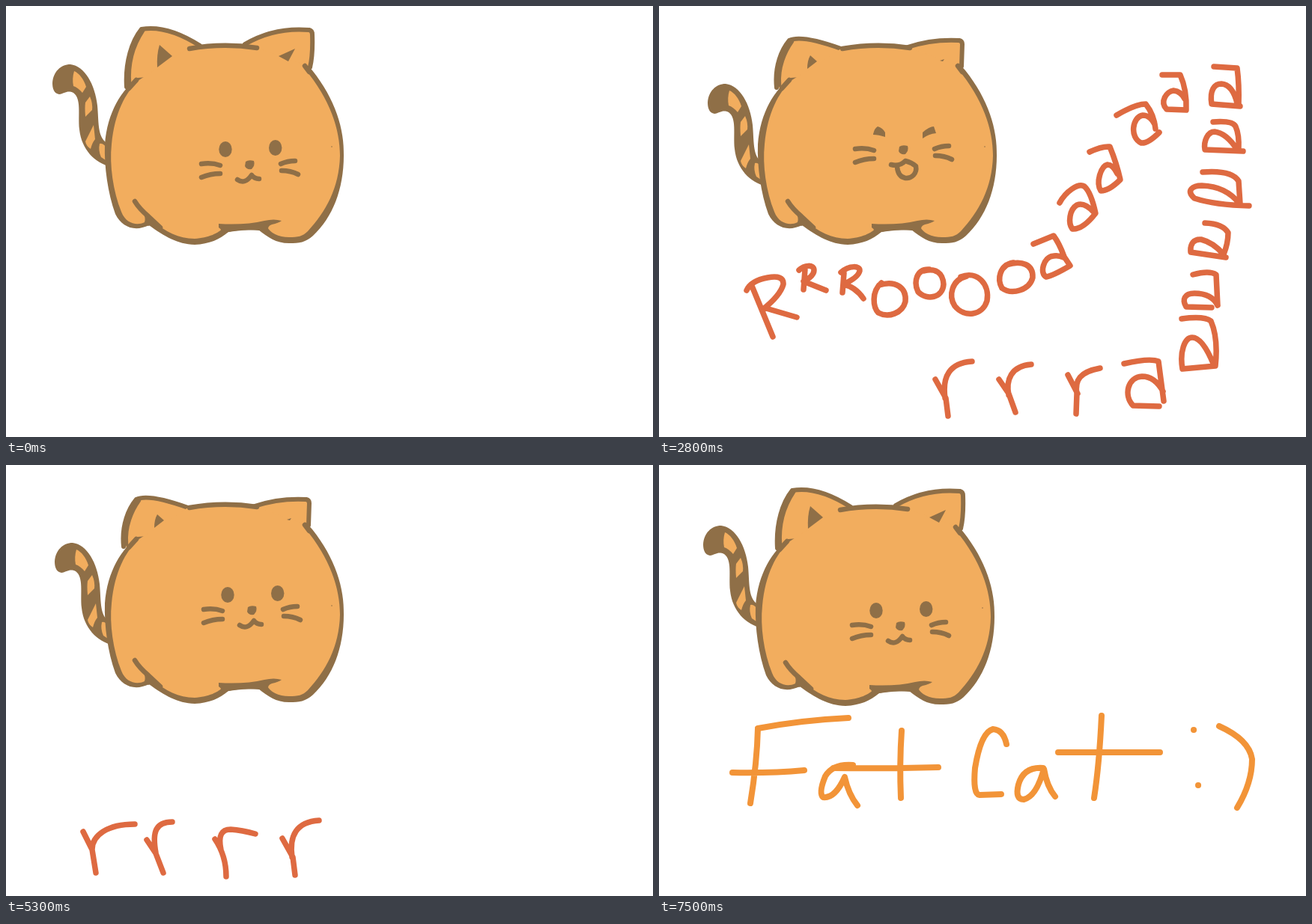
Animation, 864 px wide and 576 px high, one loop 9300 ms. Source, as an HTML page:

```html
<!DOCTYPE html>
<html lang="en">
<head>
<meta charset="utf-8">
<title>Round cat</title>
<style>
  html, body { margin: 0; width: 100%; height: 100%; overflow: hidden; background: #fff; }
  svg { display: block; width: 864px; height: 576px; --brown: #8f6f47; --fur: #f2ad5e; }
  path { stroke-linecap: round; stroke-linejoin: round; }
  .fur { fill: var(--fur); }
  .dark { fill: var(--brown); }
  .line { fill: none; stroke: var(--brown); stroke-width: 6.5; }
  .ear { fill: var(--fur); stroke: var(--brown); stroke-width: 6; }
  .roar { fill: none; stroke: #de6a41; stroke-width: 7.5; }
  .title { fill: none; stroke: #f29438; stroke-width: 8; }

  .anim { animation: 9.3s step-end infinite; }
  .scene { animation-name: scene; }
  .tail { animation-name: tail; }
  .ears-up { animation-name: ears-up; }
  .ears-down { animation-name: ears-down; }
  .face { animation-name: face; }
  .calm { animation-name: calm; }
  .open { animation-name: open; }
  .half { animation-name: half; }
  .eyes { animation-name: eyes; }
  .lids { animation-name: lids; }
  .title { animation-name: title; }
  .nudge { animation-name: nudge; }

  /* each letter lives 2.6 s, one starting every 0.1 s */
  .roar path {
    visibility: hidden;
    animation: letter 9.3s step-end calc(700ms + 100ms * var(--k)) infinite;
  }
  .roar .first { animation-name: first; }

  @keyframes letter { 0% { visibility: visible } 27.95%, 100% { visibility: hidden } }
  @keyframes first { 0% { visibility: visible } 26.88%, 100% { visibility: hidden } }
  @keyframes nudge {
    0% { transform: translate(-3px, 8px) }
    26.881% { transform: none }
    34.408%, 100% { transform: translate(-5px, 14px) }
  }
  @keyframes scene {
    0% { transform: none }
    64.516%, 100% { transform: translate(-3px, 3px) }
  }
  @keyframes tail {
    0% { transform: none }
    5.376% { transform: translate(1.5px, 13px) }
    6.451% { transform: translate(3px, 26px) }
    64.516% { transform: translate(2px, 17px) }
    65.591% { transform: translate(1px, 9px) }
    66.666%, 100% { transform: none }
  }
  @keyframes ears-up {
    0% { transform: none; visibility: visible }
    5.376% { transform: translate(-1.5px, 6px); visibility: visible }
    6.451% { visibility: hidden }
    64.516% { transform: translate(-2px, 8px); visibility: visible }
    65.591% { transform: translate(-1px, 4px); visibility: visible }
    66.666%, 100% { transform: none; visibility: visible }
  }
  @keyframes ears-down {
    0% { visibility: hidden }
    6.451% { visibility: visible }
    64.516%, 100% { visibility: hidden }
  }
  @keyframes face {
    0% { transform: none }
    5.376% { transform: translate(1.5px, -9px) }
    6.451% { transform: translate(1px, -20px) }
    32.258% { transform: translate(3px, -18px) }
    64.516% { transform: translate(2px, -12px) }
    65.591% { transform: translate(1px, -6px) }
    66.666%, 100% { transform: none }
  }
  @keyframes calm {
    0% { opacity: 1 }
    6.451% { opacity: 0 }
    32.258%, 100% { opacity: 1 }
  }
  @keyframes half {
    0% { visibility: hidden }
    6.451% { visibility: visible }
    7.526% { visibility: hidden }
    29.032% { visibility: visible }
    32.258%, 100% { visibility: hidden }
  }
  @keyframes open {
    0% { visibility: hidden }
    7.526% { visibility: visible }
    29.032%, 100% { visibility: hidden }
  }
  @keyframes eyes {
    0% { visibility: visible }
    68.817% { visibility: hidden }
    70.967% { visibility: visible }
    75.268% { visibility: hidden }
    76.344% { visibility: visible }
    77.419% { visibility: hidden }
    78.494%, 100% { visibility: visible }
  }
  @keyframes lids {
    0% { visibility: hidden }
    68.817% { visibility: visible }
    70.967% { visibility: hidden }
    75.268% { visibility: visible }
    76.344% { visibility: hidden }
    77.419% { visibility: visible }
    78.494%, 100% { visibility: hidden }
  }
  @keyframes title { 0% { visibility: hidden } 80.645%, 100% { visibility: visible } }
</style>
</head>
<body>
<svg viewBox="0 0 864 576" role="img" aria-label="A round cat roars">
  <g class="anim scene">
    <g class="anim tail">
      <path class="dark" d="M62 103C63 88 73 78 86 78C105 80 119 105 122 133C124 155 122 172 133 182L145 200L140 215C118 209 101 192 98 165C96 145 101 124 90 116C82 112 78 117 71 118C64 117 62 110 62 103Z"/>
      <path class="fur" d="M91 87C98 90 104 98 107 108L102 116Q96 109 90 107Q88 97 91 87Z"/>
      <path class="fur" d="M112 121Q116 130 115 139L106 148Q105 136 106 129Z"/>
      <path class="fur" d="M117 159L119 178Q115 183 113 191Q107 187 106 181Z"/>
      <path class="fur" d="M125 184Q129 183 133 188L133 206L127 202Q123 193 125 184Z"/>
    </g>
    <g class="anim ears-up">
      <path class="ear" d="M161 108C159 75 168 47 181 31Q215 25 259 53L250 100L175 112"/>
      <path class="ear" d="M319 51Q358 28 405 32Q409 33 409 38Q410 65 406 82L360 100"/>
      <path class="line" d="M164 104C162 76 170 51 182 33"/>
    </g>
    <g class="anim ears-down">
      <path class="ear" d="M157 109C154 80 164 58 174 46Q190 38 243 57L250 100L175 112"/>
      <path class="ear" d="M332 55Q365 44 401 46Q405 47 405 51L404 81L360 100"/>
      <path class="line" d="M160 105C158 82 167 61 177 47"/>
    </g>

    <path class="dark" d="M176 96C155 111 135 142 132 185C131 215 136 250 146 278C155 296 172 302 191 293C212 308 228 318 252 319C272 318 285 312 297 302Q316 299 337 299C350 309 360 317 378 317C392 317 400 316 410 307C436 283 451 245 451 200C452 165 440 125 409 86Q402 78 397 78Z"/>
    <path class="fur" d="M176 100C160 116 145 142 141 185C138 212 143 248 154 275C160 291 175 294 185 289L194 286C214 302 230 311 252 311C270 310 285 303 289 297L349 295C352 303 364 309 378 309C390 309 396 308 403 301C427 275 445 243 446 200C446 165 433 125 399 84L397 78L338 57Q290 49 243 57Z"/>
    <path class="line" d="M174 99L164 110M399 80L405 88M245 57Q290 49 335 56"/>
    <path class="line" d="M172 261Q178 271 190 281L206 296"/>
    <path class="dark" d="M185 289Q187 283 183 277L200 290L190 294Z"/>
    <path class="dark" d="M284 291Q320 293 345 287Q358 284 368 287Q364 290 355 292Q349 294 350 300L338 300Q315 298 297 302L288 305Q289 299 284 296Z"/>
    <circle class="dark" cx="435" cy="188" r=".8"/>

    <g class="anim ears-up dark">
      <path d="M205 52L222 67L202 82Q201 65 205 52Z"/>
      <path d="M386 57L364 67L377 74Z"/>
    </g>
    <g class="anim ears-down dark">
      <path d="M202 66L211 74L198 84Q198 73 202 66Z"/>
      <path d="M375 73L381 71L379 74Z"/>
    </g>

    <g class="anim face">
      <path class="line" d="M261 211Q275 209 286 213M261 229Q273 224 286 224M367 211Q376 207 386 207M368 220Q380 220 390 225"/>
      <path class="dark" d="M320 208Q324 205 331 207Q333 213 328 218Q321 219 319 214Z"/>
      <g class="anim calm">
        <path class="line" d="M309 232Q319 239 328 226Q332 231 338 231"/>
        <g class="anim eyes dark">
          <ellipse cx="293" cy="191.5" rx="8.7" ry="10.6"/>
          <ellipse cx="359.7" cy="189.5" rx="8.7" ry="10.6"/>
        </g>
        <path class="anim lids line" d="M278 192Q289 196 301 192M347 190Q356 194 365 190"/>
      </g>
    </g>
    <g class="anim open">
      <path class="line" d="M310 212Q321 214 329 206Q333 211 340 213C346 215 348 228 350 239Q348 252 331 252C314 252 305 247 305 237Q306 221 311 213"/>
      <path class="dark" d="M283 167Q292 161 302 170L302 174Q292 170 284 169ZM354 174Q361 163 373 164L372 168Q364 169 355 175Z"/>
    </g>
    <g class="anim half">
      <path class="line" d="M310 212Q321 215 329 207Q337 209 343 214C345 224 337 231 329 230Q319 228 318 215"/>
      <path class="dark" d="M286 171Q288 163 292 161Q299 163 302 169L302 175Q293 172 286 172ZM352 177L352 169Q361 161 367 161L370 170Q360 171 352 177Z"/>
    </g>
  </g>

  <g class="roar" aria-label="Rrrooooaaaaarrrr">
    <path class="first" style="--k:0" d="M117 380Q123 367 145 363Q167 359 166 372Q162 387 138 406L143 404L184 416M124 374L152 442"/>
    <path style="--k:1" d="M187 353C194 346 207 345 207 353Q207 361 193 368L223 380M195 352L193 379"/>
    <path style="--k:2" d="M243 356C254 346 269 347 268 354Q266 363 246 372Q262 375 273 391M247 357L245 383"/>
    <path style="--k:3" d="M297 370C283 382 286 403 293 410C306 417 325 411 329 395C331 376 315 366 294 373"/>
    <path style="--k:4" d="M361 352C343 351 340 370 346 382C358 394 379 390 380 372C379 356 369 350 354 354"/>
    <path style="--k:5" d="M411 361C391 366 386 387 395 401C408 417 432 414 438 394C442 372 425 353 403 362"/>
    <path style="--k:6" d="M473 343C455 346 451 365 458 377C472 387 495 379 499 363C500 346 485 339 464 346"/>
    <path style="--k:7" d="M500 318L527 307Q535 318 541 335L549 347Q527 360 517 362C508 358 513 335 527 334Q534 333 540 336"/>
    <path style="--k:8" d="M535 263C543 248 560 236 568 241Q577 249 583 277Q566 299 552 298C546 290 548 272 558 266Q568 262 580 275"/>
    <path style="--k:9" d="M575 195Q592 187 602 188Q611 210 616 232Q601 247 590 247C583 236 590 214 599 212Q606 212 612 224"/>
    <path style="--k:10" d="M611 146Q636 131 650 131Q661 145 663 164M668 169Q653 184 644 183C628 176 632 148 646 146Q656 146 662 158"/>
    <path style="--k:11" d="M672 92L696 92Q705 112 704 139L678 138C668 128 678 114 687 113Q697 114 702 124"/>
    <path style="--k:12" d="M741 81L772 83Q775 105 774 133M776 134L738 131C735 112 742 104 751 104Q766 105 772 130"/>
    <path style="--k:13" d="M740 155Q766 153 770 161Q775 172 774 192M780 194L729 192C727 180 733 168 742 168Q758 170 772 192"/>
    <path style="--k:14" d="M726 222Q765 219 774 234L776 264M788 267Q743 266 715 257C703 246 713 240 725 240Q757 241 775 264"/>
    <path style="--k:15" d="M729 290Q753 291 760 303Q760 317 754 332M757 336L710 329C709 318 714 311 724 312Q740 316 754 332"/>
    <path style="--k:16" d="M713 359Q735 353 744 359L746 400M738 403L704 402C698 392 702 384 715 384Q738 384 746 400"/>
    <g class="anim nudge">
      <path style="--k:17" d="M698 418Q728 414 737 421Q747 444 743 481L699 485C695 462 702 443 712 443Q726 443 741 480"/>
    </g>
    <path style="--k:18" d="M621 478Q656 470 667 475L674 528M668 535L633 534C620 520 626 496 645 495Q662 495 673 515"/>
    <path style="--k:19" d="M546 493L559 518M557 545L558 518C555 500 562 489 589 484"/>
    <path style="--k:20" d="M454 499L467 518L476 543M467 520C463 500 470 481 497 479"/>
    <path style="--k:21" d="M369 499L383 524L386 548M382 524C378 495 388 477 418 475"/>
    <path style="--k:22" d="M279 500Q294 522 294 550M287 514C283 495 288 487 300 487Q315 488 333 493"/>
    <path style="--k:23" d="M188 501L200 519L210 545M200 518C195 490 200 477 222 477"/>
    <path style="--k:24" d="M103 490L115 514L120 545M115 514C115 495 135 480 172 480"/>
  </g>

  <g class="anim title" aria-label="Fat Cat :)">
    <path d="M132 352Q190 341 253 338M132 352Q131 397 122 452M98 411Q150 412 194 408"/>
    <path d="M259 401Q232 399 222 416Q213 438 219 444Q235 446 248 417Q253 440 265 455"/>
    <path d="M233 405Q300 406 373 404M324 355Q321 400 323 445"/>
    <path d="M464 373Q460 354 446 353Q430 357 422 405Q419 440 428 441L457 440"/>
    <path d="M513 405Q487 403 480 427Q475 447 487 447Q504 443 514 406Q518 430 529 443"/>
    <path d="M533 384L669 384M591 335Q588 400 581 445"/>
    <path d="M714 354h.1M720 428h.1M748 349Q788 367 792 393Q792 425 772 458"/>
  </g>
</svg>
</body>
</html>
```
